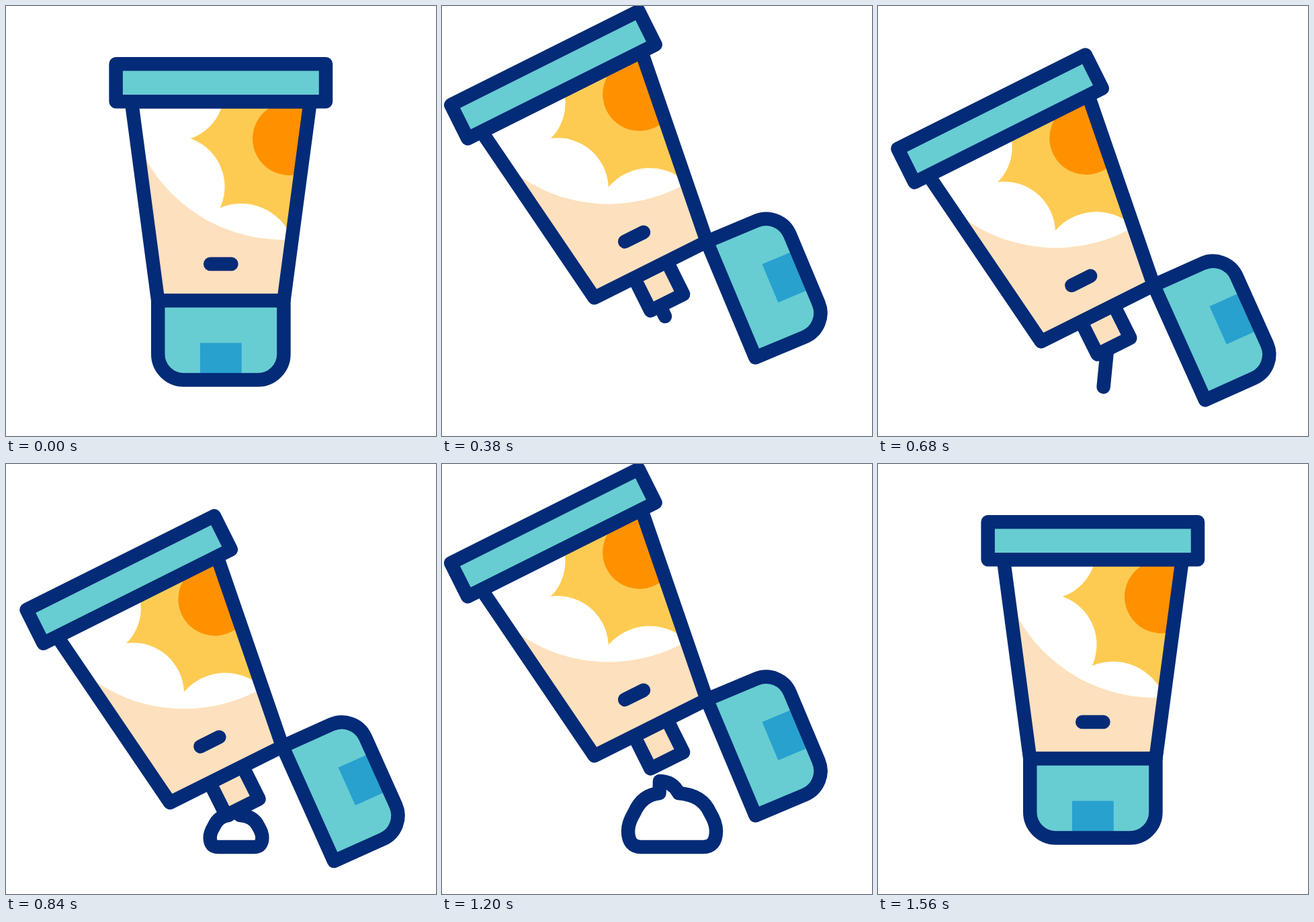
These frames come from a looping animation (640 by 640 pixels, 2400 ms). An HTML page with a canvas:

```html
<!DOCTYPE html>
<html lang="en">
<head>
<meta charset="utf-8">
<title>Sunscreen tube</title>
<style>
  html, body { margin: 0; height: 100%; overflow: hidden; background: #fff; }
  canvas { display: block; width: 100vw; height: 100vh; }
</style>
</head>
<body>
<canvas id="stage" width="640" height="640"></canvas>
<script>
const ctx = document.getElementById('stage').getContext('2d');
const LOOP = 2400, STEP = 20;
const OPENED = 386, POURING = 380, LANDED = 685, LOWEST = 770, RAISED = 1200,
      CLEARED = 1420, CLOSED = 1560;
const NAVY = '#032b77', TEAL = '#67cdd2', BLUE = '#28a1cf', SKIN = '#fde0be',
      YELLOW = '#fecb52', ORANGE = '#ff9100', WHITE = '#fff';

// The tube at rest is symmetric about AXIS.
const AXIS = 319.8;
const TOP = 142.2, BASE = 438.5;
const TOP_HALF = 133, BASE_HALF = 93.6;
const NOZZLE_HALF = 27.3, NOZZLE_LENGTH = 54.5;
const PIVOT = { x: AXIS - BASE_HALF, y: BASE };
const HINGE = { x: AXIS + BASE_HALF, y: BASE };
const PILE = { x: 342.5, y: 570 };

const rad = deg => deg * Math.PI / 180;
const clamp = v => Math.min(1, Math.max(0, v));
const lerp = (a, b, k) => a + (b - a) * k;
const ease = v => (1 - Math.cos(Math.PI * clamp(v))) / 2;
const span = (t, from, to) => ease((t - from) / (to - from));

function paint(color, path) {
  ctx.fillStyle = color;
  ctx.fill(path);
}

function paintAndOutline(color, path) {
  paint(color, path);
  ctx.stroke(path);
}

function disc(x, y, r) {
  const path = new Path2D();
  path.arc(x, y, r, 0, Math.PI * 2);
  return path;
}

function centredBox(half, top, height, radii = 0) {
  const path = new Path2D();
  path.roundRect(AXIS - half, top, half * 2, height, radii);
  return path;
}

function line(x1, y1, x2, y2) {
  ctx.beginPath();
  ctx.moveTo(x1, y1);
  ctx.lineTo(x2, y2);
  ctx.stroke();
}

function turnAbout(point, angle, dx = 0, dy = 0) {
  ctx.translate(point.x + dx, point.y + dy);
  ctx.rotate(angle);
  ctx.translate(-point.x, -point.y);
}

function getPose(t) {
  const open = span(t, 0, OPENED) - span(t, RAISED, CLOSED);
  const slide = span(t, POURING, LOWEST) - span(t, LOWEST, RAISED);
  const swing = Math.sin(Math.PI * open);
  return {
    angle: rad(-26.57 * open),
    capAngle: rad(-86.2 * open - 1.4 * clamp(slide * 2.5)),
    dx: 0.5 * open - 2.2 * swing + 18.5 * slide,
    dy: -4.2 * open + 5 * swing + 74.5 * slide
  };
}

function nozzleTip({ angle, dx, dy }) {
  const c = Math.cos(angle), s = Math.sin(angle);
  return {
    x: PIVOT.x + dx + BASE_HALF * c - NOZZLE_LENGTH * s,
    y: PIVOT.y + dy + BASE_HALF * s + NOZZLE_LENGTH * c
  };
}

// Dome in units of its half width and height, with a curl on top.
function pilePath(width, height, tip) {
  const path = new Path2D();
  const at = (u, v) => [PILE.x + u * width, PILE.y - v * height];
  path.moveTo(tip.x, tip.y);
  path.lineTo(...at(-0.29, 1));
  path.quadraticCurveTo(...at(-0.68, 0.97), ...at(-0.855, 0.645));
  path.quadraticCurveTo(...at(-1, 0.45), ...at(-1, 0.3));
  path.quadraticCurveTo(...at(-1, 0), ...at(-0.7, 0));
  path.lineTo(...at(0.7, 0));
  path.quadraticCurveTo(...at(1, 0), ...at(1, 0.3));
  path.quadraticCurveTo(...at(1, 0.45), ...at(0.855, 0.645));
  path.quadraticCurveTo(...at(0.68, 0.97), ...at(0.15, 1));
  path.quadraticCurveTo(...at(0.02, 1.22), tip.x, tip.y);
  path.closePath();
  return path;
}

function drawPile(t) {
  const spread = clamp((t - LANDED) / 125);
  const grow = span(t, LOWEST, RAISED);
  const height = lerp(45, 80, grow) * spread;
  const tip = {
    x: PILE.x - 18.5 * grow,
    y: PILE.y - height - lerp(6, 18, grow) * spread
  };
  const scale = 1 - span(t, RAISED, CLEARED);
  ctx.save();
  ctx.translate(PILE.x, PILE.y);
  ctx.scale(scale, scale);
  ctx.translate(-PILE.x, -PILE.y);
  paintAndOutline(WHITE, pilePath(lerp(37, 65.5, grow) * spread, height, tip));
  ctx.restore();
  return tip;
}

function drawCream(t, pose) {
  if (t < 340 || t >= CLEARED) return;
  const fall = t - POURING;
  const drop = {
    x: 332 + 0.012 * fall,
    y: 462 + 0.2 * fall + 0.0005 * Math.max(0, fall) ** 2
  };
  const end = t < LANDED ? drop : drawPile(t);
  if (t < 1120) {
    const tip = nozzleTip(pose);
    line(tip.x - 10, tip.y + 6, end.x, end.y);
  }
}

function drawLabel(tube) {
  ctx.save();
  ctx.clip(tube);
  paint(SKIN, tube);
  ctx.clip(disc(412, 115, 233));
  paint(YELLOW, tube);
  paint(ORANGE, disc(421.5, 197.5, 54.5));
  ctx.fillStyle = WHITE;
  ctx.fillRect(180, 140, 70, 240);
  paint(WHITE, disc(251.5, 128, 73));
  paint(WHITE, disc(249.5, 269, 76));
  paint(WHITE, disc(350, 375, 81));
  ctx.restore();
}

function drawTube() {
  const tube = new Path2D();
  tube.moveTo(AXIS - TOP_HALF, TOP);
  tube.lineTo(PIVOT.x, BASE);
  tube.lineTo(HINGE.x, BASE);
  tube.lineTo(AXIS + TOP_HALF, TOP);
  tube.closePath();

  paintAndOutline(SKIN, centredBox(NOZZLE_HALF, BASE, NOZZLE_LENGTH));
  drawLabel(tube);
  ctx.stroke(tube);
  line(AXIS - 15.6, 384, AXIS + 15.6, 384);
  paintAndOutline(TEAL, centredBox(156.2, 86.3, TOP - 86.3));
}

function drawCap() {
  const cap = centredBox(BASE_HALF, BASE, 118.1, [0, 0, 38.5, 38.5]);
  paint(TEAL, cap);
  paint(BLUE, centredBox(30.9, 501.5, 55));
  ctx.stroke(cap);
}

function draw(t) {
  const pose = getPose(t);
  ctx.fillStyle = WHITE;
  ctx.fillRect(0, 0, 640, 640);
  ctx.strokeStyle = NAVY;
  ctx.lineWidth = 20.5;
  ctx.lineCap = ctx.lineJoin = 'round';
  drawCream(t, pose);
  ctx.save();
  turnAbout(PIVOT, pose.angle, pose.dx, pose.dy);
  drawTube();
  turnAbout(HINGE, pose.capAngle);
  drawCap();
  ctx.restore();
}

const start = performance.now();
function tick() {
  const t = (performance.now() - start) % LOOP;
  draw(Math.floor(t / STEP) * STEP);
  requestAnimationFrame(tick);
}
tick();
</script>
</body>
</html>
```
